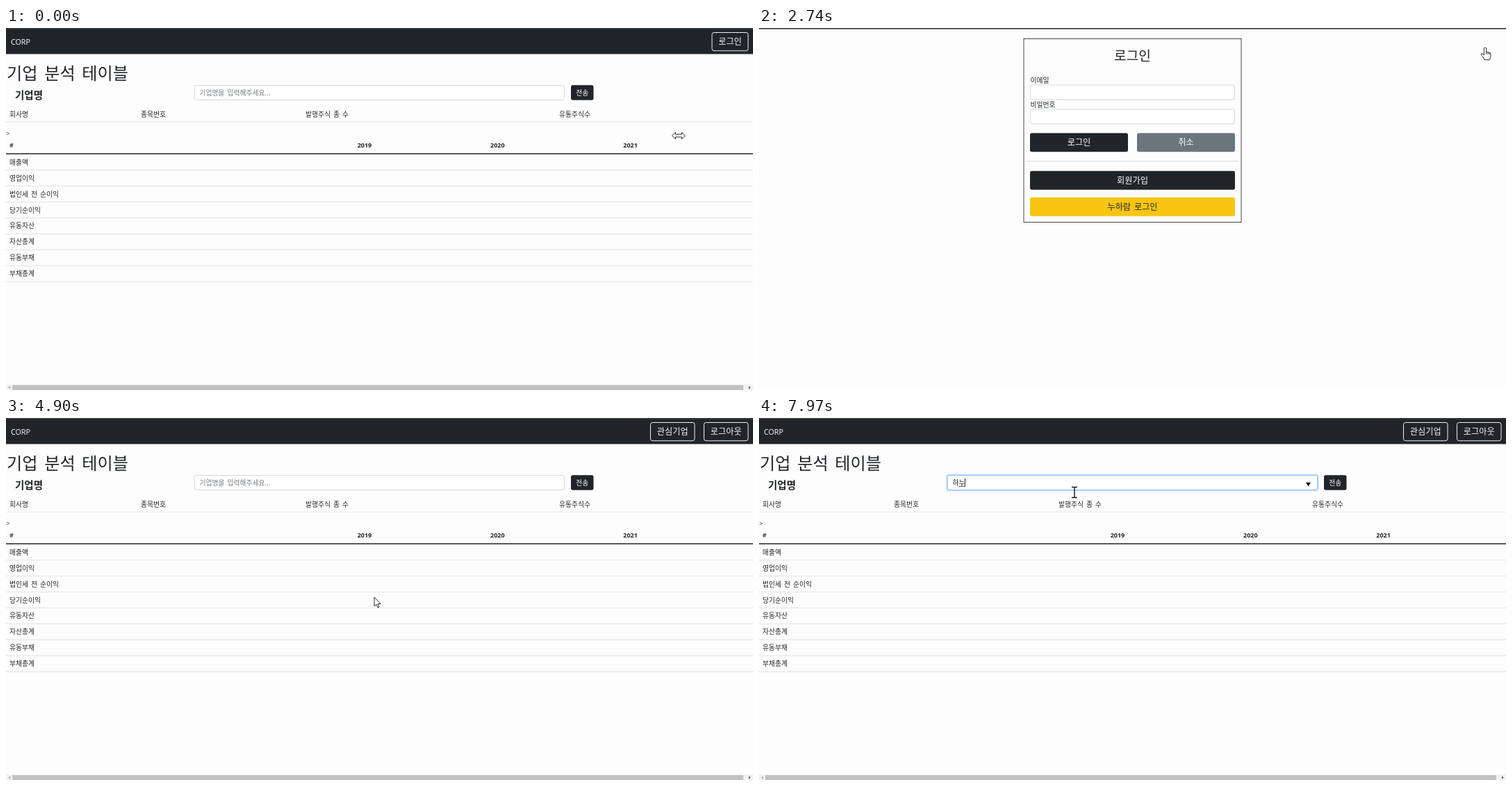
An HTML page that plays this animation: 1075x521 px, repeating every 8000 ms.

```html
<!DOCTYPE html>
<html lang="ko">
<head>
<meta charset="utf-8">
<title>기업 분석 테이블</title>
<style>
html, body { margin: 0; width: 100%; height: 100%; overflow: hidden; background: #fdfdfd; }
svg { display: block; }
text { font-family: "Noto Sans CJK KR", "Noto Sans CJK", sans-serif; word-spacing: .12em; fill: #212529; }
.latin { font-family: "Open Sans", sans-serif; }
</style>
</head>
<body>
<svg id="stage" width="1075" height="521" viewBox="0 0 1075 521"></svg>
<script>
const LOOP = 8000, DARK = '#212529', SMALL = 9.8, BUTTON = 12.2;

// y is the vertical middle of the text
const text = (x, y, s, size = SMALL, extra = '') =>
  `<text x="${x}" y="${(y + size * .375).toFixed(2)}" font-size="${size}" ${extra}>${s}</text>`;
const rect = (x, y, w, h, fill, extra = '') =>
  `<rect x="${x}" y="${y}" width="${w}" height="${h}" fill="${fill}" ${extra}/>`;
const hline = (y, color, width = 1, x1 = 0, x2 = 1075) =>
  `<path d="M${x1} ${y}H${x2}" stroke="${color}" stroke-width="${width}"/>`;
const mid = (color, id = '') => `text-anchor="middle" style="fill:${color}" ${id}`;
const button = (x, y, w, h, fill, label, color = '#fff', id = '', size = BUTTON) =>
  rect(x, y, w, h, fill, `rx="2.7" ${id}`) + text(x + w / 2, y + h / 2, label, size, mid(color));
const navButton = (x, w, label, id = '') =>
  rect(x, 6.5, w, 26.3, DARK, `rx="3" stroke="#f0f1f2" id="${id}Box"`) +
  text(x + w / 2, 19.5, label, BUTTON, mid('#f8f9fa', `id="${id}Label"`));
const field = (x, y, w, id = '') =>
  rect(x, y, w, 21, '#fff', `rx="2.5" stroke="#ced4da" stroke-width=".9" ${id}`);

const rows = ['매출액', '영업이익', '법인세 전 순이익', '당기순이익', '유동자산', '자산총계', '유동부채', '부채총계'];
const columns = [[5, '회사명'], [194, '종목번호'], [431, '발행주식 종 수'], [796, '유통주식수']];
const latin = (weight) => `class="latin" font-weight="${weight}"`;

const tablePage = `<g id="table">
  ${rect(0, 0, 1075, 37.5, DARK)}${hline(1, '#50544f', .8)}
  ${text(7, 20, 'CORP', 10.7, 'class="latin" style="fill:#fff"')}
  <g id="guest">${navButton(1016, 52, '로그인', 'login')}</g>
  <g id="member">${navButton(927.5, 63.5, '관심기업', 'star')}${navButton(1004.5, 63.5, '로그아웃', 'logout')}</g>
  ${text(1, 64.8, '기업 분석 테이블', 24.2)}
  ${text(13, 96.5, '기업명', 14.5, 'font-weight="700"')}
  <rect id="ring" x="269.3" y="80.8" width="536.2" height="24.4" rx="4" fill="#c2dbfe"/>
  ${field(271.2, 82.5, 532.4, 'id="search"')}
  ${text(278.5, 93, '', SMALL, 'id="entry"')}
  <path id="underline" stroke="${DARK}" stroke-width=".8"/>
  <path id="caret" stroke="#111" stroke-width=".9"/>
  <path id="arrow" d="M787 92.7h7l-3.5 5.8z" fill="#111"/>
  ${button(813, 82.3, 32.5, 21.5, DARK, '전송', '#fff', '', SMALL)}
  ${columns.map(([x, s]) => text(x, 124, s, SMALL, 'font-weight="500"')).join('')}
  ${hline(135.3, '#e6e8e4')}
  ${text(.5, 152, '&gt;', 8.5, 'class="latin"')}
  ${text(5, 169, '#', 9, latin(600))}
  ${[2019, 2020, 2021].map((year, i) => text(505.7 + 191.3 * i, 169, year, 9, latin(700))).join('')}
  ${hline(181, DARK, 1.3)}
  ${rows.map((s, i) => text(5, 193 + 22.95 * i, s, SMALL, 'font-weight="500"') + hline(204.4 + 22.95 * i, '#dee0e6')).join('')}
  ${rect(0, 513, 1075, 8, '#f1f1f1')}${rect(9, 514, 1052, 7, '#c1c1c1')}
  <path d="M6 515.2v4.6l-2.6-2.3z" fill="#a3a3a3"/><path d="M1069 515.2v4.6l2.6-2.3z" fill="#505050"/>
</g>`;

const loginPage = `<g id="signin">
  ${rect(0, 0, 1075, 1.6, '#3a3630')}
  ${rect(381, 15.5, 313, 264, 'none', 'stroke="#333" stroke-width=".9"')}
  ${text(537.5, 40, '로그인', 19.2, mid(DARK))}
  ${text(390.5, 75, '이메일')}${field(390.4, 82, 294.2)}
  ${text(390.5, 110, '비밀번호')}${field(390.4, 116.8, 294.2)}
  ${button(390, 151.3, 141, 27, DARK, '로그인')}
  ${button(544, 151.3, 141, 27, '#6c757d', '취소')}
  ${hline(191.8, '#d0d1d2', .9, 386, 690)}
  ${button(390, 205.7, 295, 27, DARK, '회원가입')}
  ${button(390, 243.7, 295, 27, '#f8c513', '누하람 로그인', DARK, 'id="social"')}
</g>`;

const cursors = `<g id="cursor" fill="#fff" stroke="#111" stroke-width=".9" stroke-linejoin="round">
  <path id="resize" d="M-9.5 0l5-4.7v2.8h9v-2.8l5 4.7-5 4.7v-2.8h-9v2.8z"/>
  <path id="pointer" d="M0 0v13l3-2.8 2 4.7 2-.9-2-4.5h4.2z"/>
  <path id="hand" d="M-1.6 1Q0-1 1.6 1V6.6Q3 5.4 4 7Q5.5 6.2 6.2 7.9Q8 7.4 8 9.2V12Q8 14 6.4 17.8H-1Q-3 13.5-5.7 10.6Q-6 8.5-4 9L-1.6 11ZM1.6 6.6v3.2M4 7v3M6.2 7.9v2.4"/>
  <path id="beam" d="M-3.8-7.5h3l.8.8.8-.8h3M-3.8 7.5h3l.8-.8.8.8h3M0-6.7V6.7" fill="none" stroke-width="1.4"/>
</g>`;

const stage = document.getElementById('stage');
stage.innerHTML = tablePage + loginPage + cursors;
const $ = id => document.getElementById(id);
const show = (id, on) => $(id).setAttribute('visibility', on ? 'inherit' : 'hidden');

// time, x, y of the cursor's hot spot
const path = [
  [0, 968, 155], [50, 968, 155], [800, 1004, 103], [1300, 1040, 48], [1650, 1048, 37], [1850, 1045, 34],
  [1940, 1045, 32], [2150, 1045, 28], [2950, 1045, 28], [3340, 822, 166], [3500, 678, 247],
  [3680, 590, 259], [3950, 530, 258], [5050, 530, 258], [5400, 490, 170], [5750, 454, 107], [8000, 454, 107]
];
const typing = [[7380, 'ㅎ'], [7520, '하'], [7660, '한'], [7790, '하누']];
const OPEN_LOGIN = 2620, LOGGED_IN = 4780, FOCUS = 5950;

const clamp = v => Math.min(1, Math.max(0, v));
const fade = (t, start) => { const p = clamp((t - start) / 150); return p * p * (3 - 2 * p); };
const mix = (a, b, p) => `rgb(${a.map((v, i) => Math.round(v + (b[i] - v) * p))})`;

function cursorAt(t) {
  const i = path.findIndex(p => p[0] > t);
  const [t0, x0, y0] = path[i - 1], [t1, x1, y1] = path[i];
  const p = (t - t0) / (t1 - t0);
  return [x0 + (x1 - x0) * p, y0 + (y1 - y0) * p];
}

function drawCursor(t, x, y) {
  const overField = t > LOGGED_IN && y < 112;
  const overButton = t > 1915 && t < 2960 || t > 3490 && t < LOGGED_IN;
  const kind = t < 50 ? 'resize' : overField ? 'beam' : overButton ? 'hand' : 'pointer';
  for (const id of ['resize', 'pointer', 'hand', 'beam']) show(id, id === kind);
  $('cursor').setAttribute('transform', `translate(${x.toFixed(1)} ${y.toFixed(1)})`);
  show('arrow', overField);
}

function drawEntry(t) {
  const typed = typing.filter(k => k[0] <= t);
  const value = typed.length ? typed[typed.length - 1][1] : '';
  const end = 278.3 + 9 * value.length;
  const lastKey = typed.length ? typed[typed.length - 1][0] : FOCUS;
  const focus = fade(t, FOCUS + 15);
  $('entry').textContent = value || '기업명을 입력해주세요...';
  $('entry').style.fill = value ? DARK : '#757c83';
  $('underline').setAttribute('d', value ? `M${end - 9} 98.3H${end - .5}` : '');
  $('caret').setAttribute('d', `M${end + .2} 87v12`);
  show('caret', t >= FOCUS && Math.floor((t - lastKey) / 530) % 2 === 0);
  $('ring').setAttribute('opacity', focus);
  $('search').setAttribute('stroke', mix([206, 212, 218], [134, 183, 254], focus));
}

function draw(t) {
  const signin = t >= OPEN_LOGIN && t < LOGGED_IN;
  show('signin', signin);
  show('table', !signin);
  show('guest', t < OPEN_LOGIN);
  show('member', t >= LOGGED_IN);

  const hover = fade(t, 1910);
  $('loginBox').setAttribute('fill', mix([33, 37, 41], [248, 249, 250], hover));
  $('loginLabel').style.fill = mix([248, 249, 250], [0, 0, 0], hover);
  $('social').setAttribute('fill', mix([248, 197, 19], [249, 206, 52], fade(t, 3490)));

  drawEntry(t);
  drawCursor(t, ...cursorAt(t));
  if (signin) for (const id of ['guest', 'member', 'arrow', 'caret']) show(id, false);
}

const start = performance.now();
function tick() {
  draw((performance.now() - start) % LOOP);
  requestAnimationFrame(tick);
}
tick();
</script>
</body>
</html>
```
